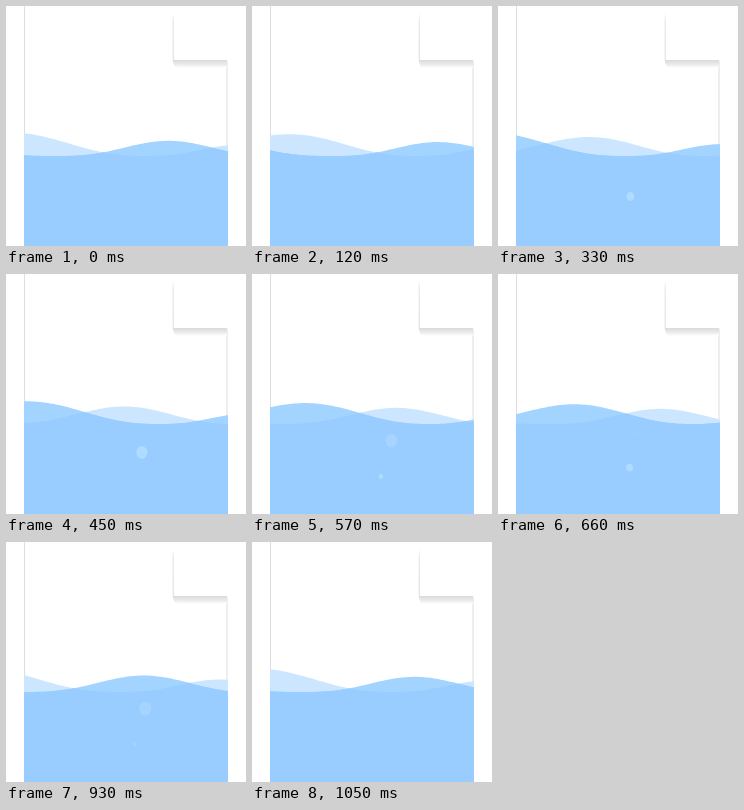
These frames come from a looping animation (240 by 240 pixels, 1.08 s). An HTML page:

```html
<!DOCTYPE html>
<html lang="en">
<head>
<meta charset="utf-8">
<title>Water tank</title>
<style>
  html, body { margin: 0; width: 100%; height: 100%; overflow: hidden; background: #fff; }
  svg { display: block; width: 100vw; height: 100vh; }
</style>
</head>
<body>
<svg viewBox="0 0 240 240">
  <defs>
    <linearGradient id="shade" x2="0" y2="1">
      <stop offset="0" stop-color="#dadada"/>
      <stop offset=".55" stop-color="#ebebeb"/>
      <stop offset="1" stop-color="#fff"/>
    </linearGradient>
    <linearGradient id="rim" x2="0" y2="1">
      <stop offset="0" stop-color="#fff"/>
      <stop offset=".15" stop-color="#e2e2e2"/>
      <stop offset="1" stop-color="#dcdcdc"/>
    </linearGradient>
  </defs>
  <rect x="18" y="0" width="1" height="240" fill="#dedede"/>
  <rect x="220.5" y="55" width="1" height="185" fill="#dedede"/>
  <path d="M167 54H221V62H173Q168 62 167 56Z" fill="url(#shade)"/>
  <rect x="166.7" y="7" width="1" height="48" fill="url(#rim)"/>
  <path id="back" fill="#cce6ff"/>
  <path id="front" fill="#a3d3ff"/>
  <path id="both" fill="#99ccff"/>
  <g fill="#aedbff">
    <ellipse class="bubble"/>
    <ellipse class="bubble"/>
    <ellipse class="bubble"/>
  </g>
</svg>
<script>
  const LOOP = 1080, STEP = 30, WAVE = 1050, LEAD = 390;
  const LEFT = 18, RIGHT = 222, FLOOR = 150;
  const paths = ['back', 'front', 'both'].map(id => document.getElementById(id));
  const bubbles = document.querySelectorAll('.bubble');
  // Start time, end time and strength of each bubble
  const lives = [[180, 720, 1], [540, 1040, 1], [900, 1020, 0.4]];

  const clamp = (v, lo, hi) => Math.min(hi, Math.max(lo, v));

  // Crests flatten and slow down as they travel to the right
  function surface(x, t) {
    const d = x - LEFT;
    const delay = 418 + 3.4 * d + 0.0053 * d * d;
    const swell = (1 + Math.cos(2 * Math.PI * (t - delay) / WAVE)) / 2;
    return FLOOR - (23 - 0.053 * d) * Math.pow(swell, 1.5 - 0.0015 * d);
  }

  function area(height) {
    let d = `M${LEFT} 240`;
    for (let x = LEFT; x <= RIGHT; x += 2) d += `L${x} ${height(x).toFixed(2)}`;
    return d + `L${RIGHT} 240Z`;
  }

  function drawBubble(el, t, [start, end, strength]) {
    const rise = (t - start) * 0.1;
    const r = clamp(2.1 + 0.16 * rise, 0, 7);
    const fade = clamp((51 - rise) / 23, 0, 1);
    el.setAttribute('cx', 128 + 0.29 * clamp(rise, 0, 40));
    el.setAttribute('cy', 205.5 - rise);
    el.setAttribute('rx', r * 0.87);
    el.setAttribute('ry', r);
    el.setAttribute('opacity', t > start && t < end ? strength * fade : 0);
  }

  function draw(now) {
    const t = Math.floor(now % LOOP / STEP) * STEP;
    const back = x => surface(x, t + LEAD);
    const front = x => surface(x, t);
    const both = x => Math.max(back(x), front(x));
    [back, front, both].forEach((f, i) => paths[i].setAttribute('d', area(f)));
    bubbles.forEach((el, i) => drawBubble(el, t, lives[i]));
  }

  const origin = performance.now();
  function tick() {
    draw(performance.now() - origin);
    requestAnimationFrame(tick);
  }
  tick();
</script>
</body>
</html>
```
